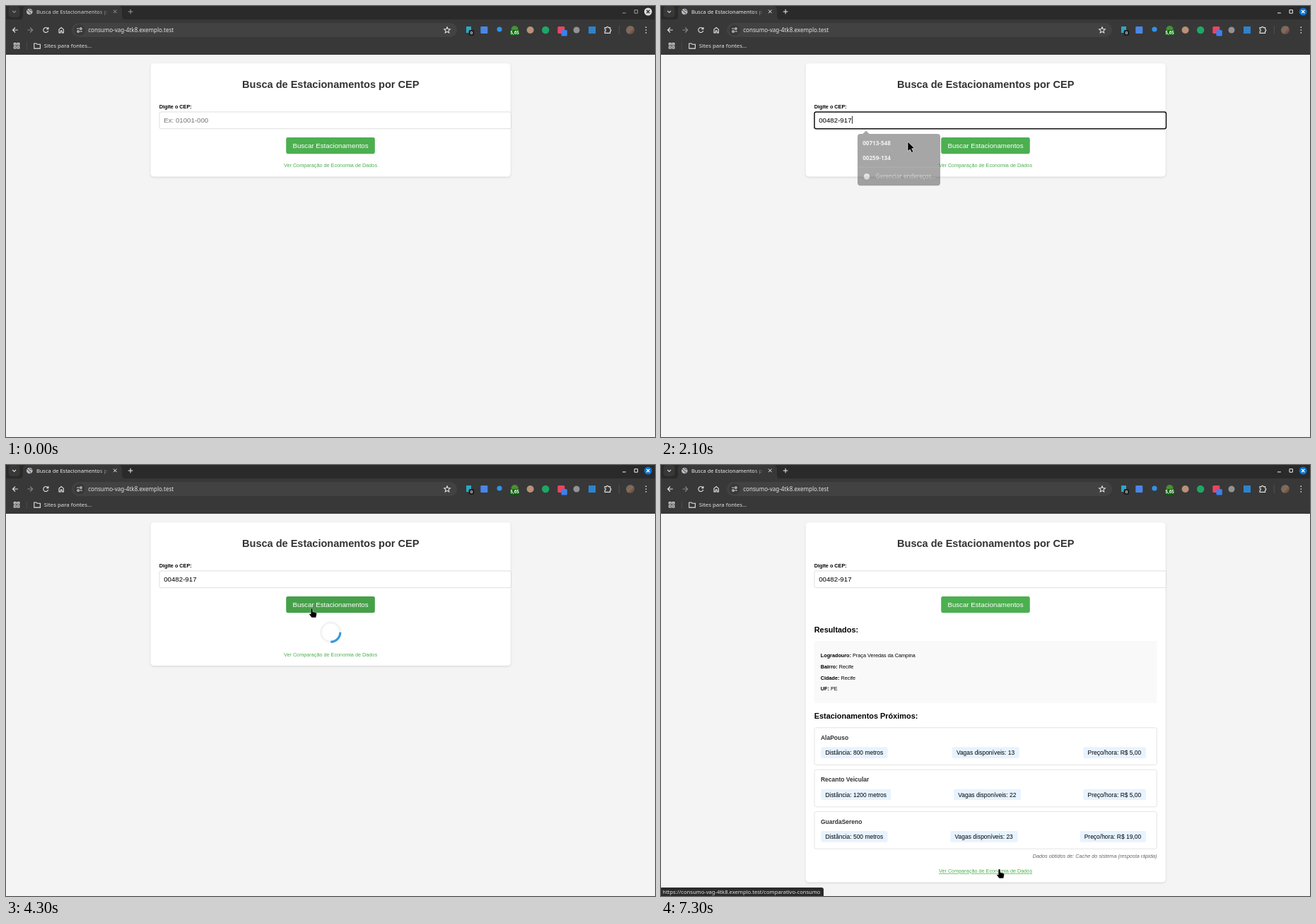
These frames come from a looping animation (918x610 px, 8 s). An HTML page:

```html
<!DOCTYPE html>
<html lang="pt-BR">
<head>
<meta charset="utf-8">
<title>Busca de Estacionamentos por CEP</title>
<style>
html, body { margin: 0; width: 100%; height: 100%; overflow: hidden; background: #f4f4f4; }
svg { display: block; }
text { white-space: pre; }
.page text { font-family: "Liberation Sans", Arial, sans-serif; }
.ui text { font-family: "Noto Sans", "Open Sans", sans-serif; fill: #e3e3e3; }
.s { font-size: 7.27px; }
.m { font-size: 8.48px; }
.l { font-size: 9.7px; }
.h { font-size: 10.91px; }
.b { font-weight: bold; }
.mid { text-anchor: middle; }
.line { fill: none; stroke: #e3e3e3; stroke-width: 1.1; }
.dim { stroke: #858585; }
#card { fill: #fff; filter: drop-shadow(0 1px 1.5px rgba(0, 0, 0, .13)); }
#link { fill: #4caf50; }
#win { --fg: #9a9a9a; --title: #cfcfcf; --close: #dedede; --x: #2b2b2b; }
#win.on { --fg: #f0f0f0; --title: #eaeaea; --close: #0873d1; --x: #fff; }
#win .fg { fill: none; stroke: var(--fg); }
#win .title { fill: var(--title); }
#cursor path { stroke-linejoin: round; }
</style>
</head>
<body>
<svg width="918" height="610" viewBox="0 0 918 610">
  <defs>
    <linearGradient id="fade"><stop offset="0" stop-color="#383838" stop-opacity="0"/><stop offset="1" stop-color="#383838"/></linearGradient>
    <linearGradient id="photo" x2="1" y2="1"><stop offset="0" stop-color="#5d6b60"/><stop offset=".5" stop-color="#8a6a58"/><stop offset="1" stop-color="#4a3d3a"/></linearGradient>
  </defs>

  <g class="page">
    <rect width="918" height="610" fill="#f4f4f4"/>
    <rect id="card" x="204.7" y="81.2" width="509" height="160.4" rx="4.5"/>
    <text class="b mid" x="459.2" y="116.3" font-size="14.54" fill="#333">Busca de Estacionamentos por CEP</text>
    <text class="s b" x="216.7" y="144.9">Digite o CEP:</text>
    <rect id="field" x="217" y="149.9" width="497.5" height="23.8" rx="2.4" fill="#fff"/>
    <text id="value" class="l" x="223.2" y="164.8"></text>
    <rect id="caret" y="155.6" width=".8" height="11"/>
    <rect id="button" x="396.2" y="186" width="125.6" height="23.2" rx="2.4"/>
    <text class="l mid" x="459" y="200.7" fill="#fff">Buscar Estacionamentos</text>
    <g id="spinner" fill="none" stroke-width="3">
      <circle cx="459.2" cy="236.7" r="13.6" stroke="#f3f3f3"/>
      <path id="arc" d="M449.58 227.08A13.6 13.6 0 0 1 468.82 227.08" stroke="#3498db"/>
    </g>
    <g id="results"></g>
    <text id="link" class="s mid" x="459">Ver Comparação de Economia de Dados</text>
  </g>

  <g id="popup" class="ui">
    <path d="M284.8 181.5l5.2-5 5.2 5z" fill="#3c3c3c"/>
    <rect x="278" y="181" width="117" height="73.3" rx="4" fill="#3c3c3c"/>
    <text class="b" font-size="8.08" x="285.2" y="197">00713-548</text>
    <text class="b" font-size="8.08" x="285.2" y="218.1">00259-134</text>
    <path d="M278 228.2h117" stroke="#5c5c5c" stroke-width=".7"/>
    <circle cx="291" cy="241.3" r="4.2" fill="#c4c4c4"/>
    <text font-size="8.08" x="303.8" y="244.3" style="fill:#a8a8a8">Gerenciar endereços…</text>
  </g>

  <g id="win" class="ui">
    <rect width="918" height="20" fill="#2a2a2a"/>
    <rect y="19" width="918" height="50" fill="#383838"/>
    <path d="M19 19.5Q24 19 24 14V6Q24 0 30 0H158Q164 0 164 6V14Q164 19 169 19.5Z" fill="#383838"/>
    <rect x="3.5" y="0" width="16" height="16" rx="4.5" fill="#383838"/>
    <path class="fg" d="M9.2 6.9l2.4 2.4 2.4-2.4" stroke-width="1.1"/>
    <circle cx="33.3" cy="8" r="4.3" fill="#b9bcc0"/>
    <path d="M30 6.3q2 .2 2.4 1.7t2.1 1.2q.6 1.4-.5 2.4M33.5 4.3q-.6 1.7 1.2 1.8t2.2 1.2" fill="none" stroke="#45484b"/>
    <text class="title" font-size="7.48" x="42.9" y="10.9">Busca de Estacionamentos p</text>
    <rect x="131" y="2" width="15" height="13" fill="url(#fade)"/>
    <path class="fg" d="M152 5.5l4.6 4.6m0-4.6l-4.6 4.6M172.8 8h6.6M176.1 4.7v6.6"/>
    <path class="fg" d="M872 9.9h4.8M889 5.6h4.4v4.6h-4.4z"/>
    <circle cx="908.2" cy="8" r="5.5" fill="var(--close)"/>
    <path d="M906 5.8l4.4 4.4m0-4.4l-4.4 4.4" stroke="var(--x)" stroke-width="1.3"/>

    <path class="line" d="M16.8 34H9.6m3.4-3.5L9.5 34l3.5 3.5"/>
    <path class="line dim" d="M30.4 34h7.2m-3.4-3.5l3.5 3.5-3.5 3.5"/>
    <path class="line" d="M59.3 32.1A3.5 3.5 0 1 0 59.7 35M59.9 30v2.8h-2.8"/>
    <path class="line" d="M75 33.2l3.2-2.7 3.2 2.7v4.7h-2.2v-2.8h-2v2.8H75z"/>
    <rect x="93" y="24" width="545" height="20" rx="10" fill="#424242"/>
    <circle cx="104" cy="34" r="7.6" fill="#383838"/>
    <path class="line" d="M100.2 32h3.2M104.6 36h3.2" stroke-width="1"/>
    <circle class="line" cx="105.9" cy="32" r="1.3"/>
    <circle class="line" cx="102.1" cy="36" r="1.3"/>
    <text font-size="8.06" x="116.2" y="36.9">consumo-vag-4tk8.exemplo.test</text>
    <path class="line" stroke-width=".8" d="M624 29.8l1.2 2.8 3.1.3-2.3 2 .7 3-2.7-1.6-2.7 1.6.7-3-2.3-2 3.1-.3z"/>

    <rect x="651" y="29" width="7" height="9" fill="#29a9c5"/>
    <rect x="654.6" y="34" width="7.6" height="8" rx="1.5" fill="#202124"/>
    <text class="b mid" font-size="6" x="658.4" y="40.3">0</text>
    <rect x="671.3" y="29" width="10" height="10" rx="1" fill="#4a86e8"/>
    <circle cx="698" cy="33" r="3.6" fill="#2f93e8"/>
    <circle cx="719.6" cy="33" r="5" fill="#4a8f35"/>
    <rect x="713" y="34" width="13.4" height="8" rx="1.5" fill="#096309"/>
    <text class="b mid" font-size="6.2" x="719.7" y="40.3" style="fill:#fff">5,65</text>
    <circle cx="741.6" cy="34" r="5" fill="#b99078"/>
    <circle cx="763.2" cy="34" r="5.2" fill="#1ea765"/>
    <rect x="780.3" y="29" width="10" height="10" rx="1.5" fill="#ea4560"/>
    <rect x="785.4" y="34" width="8.4" height="8.4" rx="1.5" fill="#3f7fee"/>
    <circle cx="807" cy="34" r="4.5" fill="#929292"/>
    <rect x="824" y="29" width="10" height="10" fill="#2e83cc"/>
    <path class="line" d="M847 30.6h2.4a1.3 1.3 0 0 1 2.6 0h2.6v2.4a1.3 1.3 0 0 1 0 2.6v2.8H847v-2.6a1.4 1.4 0 0 0 0-2.8z"/>
    <path d="M867.3 28v12" stroke="#515151"/>
    <circle cx="883" cy="34" r="6" fill="url(#photo)"/>
    <path d="M905.3 30.2h.01m0 3.8h.01m-.01 3.8h.01" stroke="#e3e3e3" stroke-width="1.7" stroke-linecap="round"/>

    <path class="line" d="M11.4 52.6h2.7v2.7h-2.7zm4.7 0h2.7v2.7h-2.7zm-4.7 4.7h2.7v2.7h-2.7zm4.7 0h2.7v2.7h-2.7z"/>
    <path d="M29.3 51v11" stroke="#4b4b4b"/>
    <path class="line" stroke-width=".9" d="M39.8 53h3.2l1.1 1.2h4.3v5.9h-8.6z"/>
    <text font-size="7.84" x="53.7" y="59.4">Sites para fontes…</text>
  </g>

  <g id="status" class="ui">
    <path d="M0 598H227Q230 598 230 601V610H0Z" fill="#2b2b2b"/>
    <text font-size="7.6" x="2.2" y="607">https://consumo-vag-4tk8.exemplo.test/comparativo-consumo</text>
  </g>

  <g id="cursor">
    <path id="arrow" d="M0 0V13.6L3.2 11 5.6 15.5 8 14.3 5.7 9.9 9.4 9.2Z" stroke="#fff" stroke-width=".6"/>
    <g id="beam" fill="none">
      <path d="M-2.8-5.6Q0-5.6 0-4V4.2Q0 5.8-2.8 5.8M2.8-5.6Q0-5.6 0-4M0 4.2Q0 5.8 2.8 5.8" stroke="#fff" stroke-width="2.4"/>
      <path d="M-2.8-5.6Q0-5.6 0-4V4.2Q0 5.8-2.8 5.8M2.8-5.6Q0-5.6 0-4M0 4.2Q0 5.8 2.8 5.8" stroke="#000" stroke-width="1.3"/>
    </g>
    <path id="hand" d="M-1.4 1Q0-1.4 1.4 1V4.6L5.6 5.6Q7.3 6.2 7 8L6 13H-.2L-3.6 8.4Q-3.4 6.8-1.4 8Z" stroke="#fff" stroke-width=".5"/>
  </g>
</svg>

<script>
const LOOP = 8000, TICK = 100;
const $ = id => document.getElementById(id);
const set = (id, attrs) => { for (const k in attrs) $(id).setAttribute(k, attrs[k]); };
const show = (id, on) => { $(id).style.display = on ? '' : 'none'; };

const text = (x, y, cls, str, extra = '') => `<text x="${x}" y="${y}" class="${cls}" ${extra}>${str}</text>`;
const badge = (x, y, w, str) =>
  `<rect x="${x}" y="${y}" width="${w}" height="15.6" rx="2.2" fill="#e7f3ff"/>` + text(x + 6.1, y + 10.9, 'm', str);

const address = [
  ['Logradouro', 'Praça Veredas da Campina'], ['Bairro', 'Recife'], ['Cidade', 'Recife'], ['UF', 'PE']
];
const lots = [
  { name: 'AlaPouso', far: 800, free: 13, price: '5,00', x: [411.8, 597.4], w: 94.2 },
  { name: 'Recanto Veicular', far: 1200, free: 22, price: '5,00', x: [414.1, 597.4], w: 98.9 },
  { name: 'GuardaSereno', far: 500, free: 23, price: '19,00', x: [409.5, 592.6], w: 94.2 }
];

$('results').innerHTML =
  text(216.7, 237, 'h b', 'Resultados:') +
  '<rect x="216.7" y="249" width="484.8" height="88" rx="2" fill="#f9f9f9"/>' +
  address.map(([k, v], i) => text(225.8, 272.1 + i * 15.75, 's', `<tspan class="b">${k}:</tspan> ${v}`)).join('') +
  text(216.7, 359.3, 'h b', 'Estacionamentos Próximos:') +
  lots.map((p, i) => {
    const y = 371.8 + i * 59.4;
    return `<rect x="217" y="${y}" width="484.3" height="52.6" rx="2.4" fill="#fff" stroke="#ddd" stroke-width=".8"/>` +
      text(226, y + 17.1, 'm b', p.name, 'fill="#333"') +
      badge(226.3, y + 27.5, p.w, `Distância: ${p.far} metros`) +
      badge(p.x[0], y + 27.5, 95, `Vagas disponíveis: ${p.free}`) +
      badge(p.x[1], y + 27.5, 686 - p.x[1], `Preço/hora: R$ ${p.price}`);
  }).join('') +
  text(701.4, 556.2, 's', 'Dados obtidos de: Cache do sistema (resposta rápida)',
    'text-anchor="end" font-style="italic" fill="#666"');

// pointer stops: time, x, y
const path = [
  [400, 346, 34], [700, 322, 120], [900, 285, 232], [1200, 311, 175], [1500, 309.5, 161],
  [1900, 309.5, 161], [2100, 349, 192], [2500, 430, 203], [2800, 434, 213], [3100, 434, 213],
  [3300, 432.5, 203], [5100, 432.5, 203], [5200, 422, 245], [5400, 376, 474], [5700, 555.3, 308],
  [6000, 555.3, 308], [6200, 565, 337], [6400, 565, 337], [7200, 478.5, 570], [7300, 478.5, 572]
];

function pointer(t) {
  const i = path.findIndex(p => p[0] > t);
  if (i < 0) return path[path.length - 1].slice(1);
  const [a, b] = [path[Math.max(i - 1, 0)], path[i]];
  const k = Math.max(0, (t - a[0]) / (b[0] - a[0]));
  return [a[1] + (b[1] - a[1]) * k, a[2] + (b[2] - a[2]) * k];
}

function draw(now) {
  const t = Math.floor(now % LOOP / TICK) * TICK;
  const [x, y] = pointer(t);
  const inside = (l, top, r, bottom) => x >= l && x <= r && y >= top && y <= bottom;

  const focused = t >= 1800 && t < 3300;
  const typed = t >= 2000;
  const loading = t >= 3600 && t < 4400;
  const done = t >= 4400;
  const linkY = done ? 577 : loading ? 270.6 : 228.1;
  const onButton = t >= 400 && inside(396, 186, 522, 209.5);
  const onLink = t >= 400 && inside(393, linkY - 8, 525, linkY + 2);
  const onText = inside(93, 24, 638, 44) || inside(217, 149, 715, 174);

  $('win').classList.toggle('on', t >= 1800);
  set('card', { height: linkY - 67.7 });
  set('field', { stroke: focused ? '#101010' : '#d6d6d6', 'stroke-width': focused ? 1.5 : .8 });
  $('value').textContent = typed ? '00482-917' : 'Ex: 01001-000';
  set('value', { fill: typed ? '#000' : '#757575' });
  set('caret', { x: typed ? 270 : 223 });
  show('caret', focused);
  set('button', { fill: onButton ? '#45a049' : '#4caf50' });

  show('popup', t >= 1800 && t < 2200);
  set('popup', { opacity: t < 2100 ? 1 : .45 });
  show('spinner', loading);
  set('arc', { transform: `rotate(${(t - 3550) * .18} 459.2 236.7)` });
  show('results', done);
  set('link', { y: linkY, 'text-decoration': onLink ? 'underline' : 'none' });
  show('status', onLink);

  show('cursor', t >= 400);
  set('cursor', { transform: `translate(${x} ${y})` });
  const shape = onButton || onLink ? 'hand' : onText ? 'beam' : 'arrow';
  for (const id of ['arrow', 'beam', 'hand']) show(id, id === shape);
}

const start = performance.now();
function loop() {
  draw(performance.now() - start);
  requestAnimationFrame(loop);
}
loop();
</script>
</body>
</html>
```
